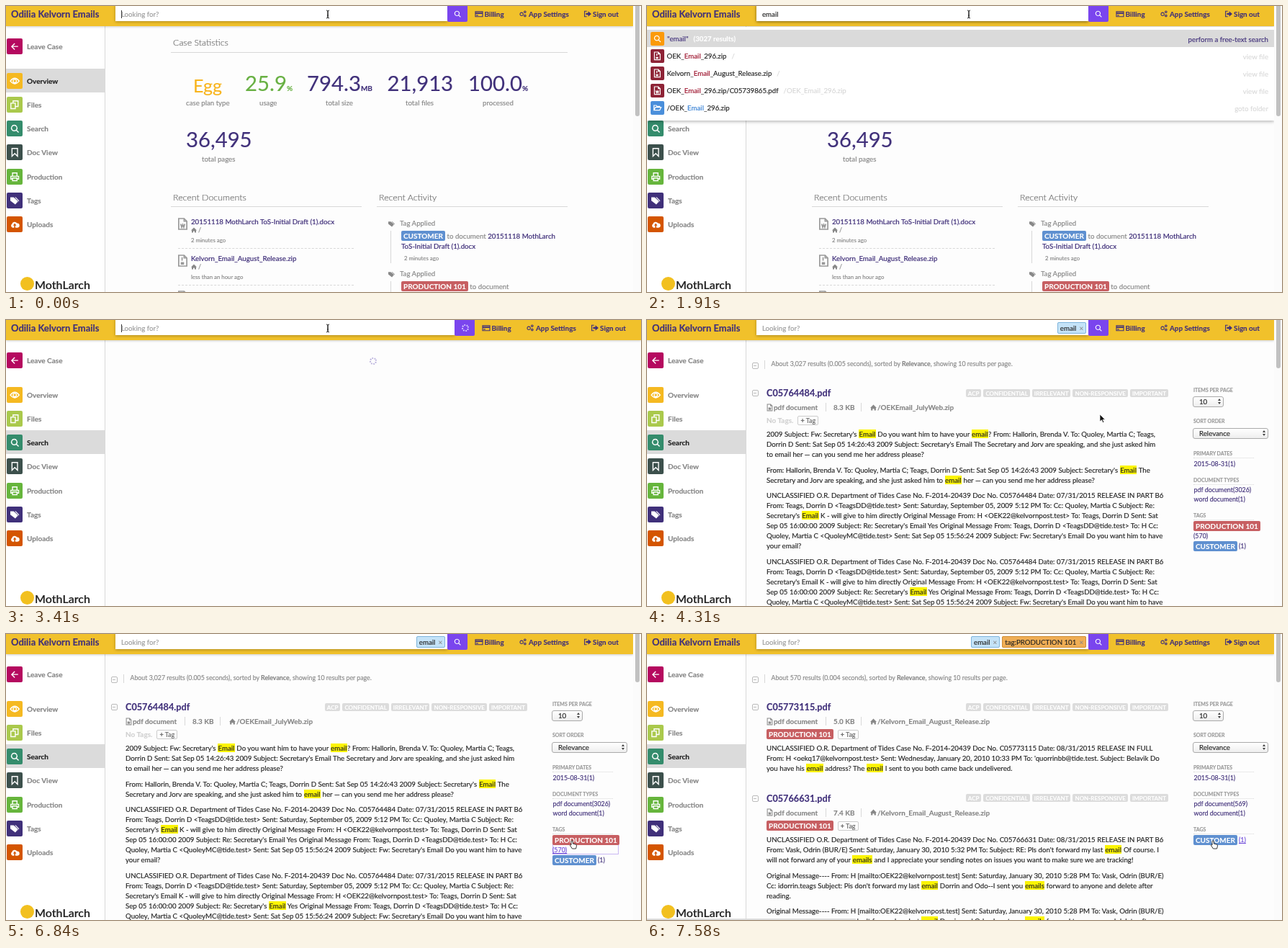
Animation of 882x397 px, one loop 8000 ms. Source, as an HTML page:

```html
<!DOCTYPE html>
<html lang="en">
<head>
<meta charset="utf-8">
<title>Case search</title>
<style>
  html, body { margin: 0; width: 100%; height: 100%; overflow: hidden; }
  #stage { position: relative; width: 882px; height: 397px; overflow: hidden; background: #fdfdfd;
    font: 10px/20px Lato, sans-serif; color: #858585; -webkit-text-stroke: .15px; }
  #stage div, #stage svg { position: absolute; white-space: pre; }
  #stage svg { overflow: visible; }
  .badge { color: #fff; font-size: 10px; padding: 1px 3px; border-radius: 2px; }
  .caret { display: inline-block; height: 11px; border-left: 1px solid #333; margin-right: -1px; vertical-align: -2px; }
  .chip { border: 1px solid; border-radius: 2px; padding: 1px 3px; margin-left: 3px; color: #222; }
  .chip i { font-style: normal; color: #888; margin-left: 4px; }
  .add { border: 1px solid #ccc; border-radius: 2px; padding: 0 3px; margin-left: 6px; color: #666; font-size: 9px; }
  .off { background: #dcdcdc; color: #fff; padding: .5px 3px; border-radius: 2px; margin-left: 3px; }
  .path { color: #d6d6d6; margin-left: 7px; }
  mark { background: #fcf403; color: inherit; padding: 0 .5px; }
</style>
</head>
<body>
<div id="stage"></div>
<script>
const stage = document.getElementById('stage');
const LOOP = 8000, PURPLE = '#40307a', RED = '#c75f62', BLUE = '#5f90d0', INK = '#222';
const BODY = 9.7, SMALL = 7.8;

// Icons on a 16 x 16 grid: path, then whether it is filled
const ICONS = {
  back: ['M14 8H3M8 2.5L2.5 8L8 13.5'],
  eye: ['M0 8Q8-2 16 8Q8 18 0 8zM8 5a3 3 0 1 0 .1 0z'],
  copy: ['M1 5h8v10H1zM5 5V1h9v10H9'],
  find: ['M7 2a5 5 0 1 0 .1 0zM11 11l4 4'],
  flag: ['M3 1h10v14l-5-5l-5 5z'],
  print: ['M4 7V1h8v6M4 12H1V7h14v5h-3M4 10h8v5H4z'],
  tag: ['M0 2h6l8 7l-5 6L0 8zM10 2l6 6l-5 7l4-6L8 2z', 1],
  cloud: ['M4 14a4 4 0 0 1-1-7a5 5 0 0 1 9-1a4 4 0 0 1 1 8H9v-4h2L8 6L5 10h2v4z', 1],
  card: ['M0 3h16v11H0zM0 6h16M0 7h16M2 11h4'],
  cogs: ['M5 5a3.5 3.5 0 1 0 .1 0zM12.500 1.500a2 2 0 1 0 .1 0zM12.500 10a2 2 0 1 0 .1 0z'],
  exit: ['M6 2H1v12h5', 0, 'M4 6h5V2l7 6l-7 6v-4H4z'],
  home: ['M8 1L0 9h2v6h4v-4h4v4h4V9h2z', 1],
  file: ['M2 0h8l4 4v12H2zM10 0v4h4M5 8l1.500 5L8 9l1.500 4L11 8'],
  zip: ['M2 0h8l4 4v12H2zM10 0v4h4M7 3v5M6 11h3v2H6z'],
  folder: ['M1 13V3h5l1 2h6v2M1 13l3-6h12l-3 6z']
};
const CURSORS = {
  beam: '<path d="M-2-5Q0-5 0-3V4Q0 6-2 6M2-5Q0-5 0-3V4Q0 6 2 6M-1 2H1" fill="none" stroke="#222"/>',
  arrow: '<path d="M0 0V10L2.500 7.800L4.200 11.500L5.800 10.700L4.200 7.200H7.300z" fill="#111" stroke="#fff" stroke-width=".7"/>',
  hand: '<path d="M0 0q1.300-.6 1.300 1v3l4.500 1.200q1 .5.500 3L5.500 11H.5L-2.600 6.500q0-1.500 1.600-.5L-1 1Q-1 .2 0 0z" fill="#fff" stroke="#222" stroke-width=".9"/>'
};

const text = (x, y, size, html, css = '') =>
  `<div style="left:${x}px;top:${y - 10}px;font-size:${size}px;${css}">${html}</div>`;
const right = (edge, y, html, css = '') => text(0, y, BODY, html, `left:auto;right:${882 - edge}px;${css}`);
const box = (x, y, w, h, css) => `<div style="left:${x}px;top:${y}px;width:${w}px;height:${h}px;${css}"></div>`;
const fill = c => `background:${c};`;
const ink = (c, weight = 400) => `color:${c};font-weight:${weight};`;
const line = (x, y, w, style = 'solid') => box(x, y, w, 0, `border-top:1px ${style} #d8d8d8`);
const rule = (x, y, h) => box(x, y, 1, h, fill('#d8d8d8'));
const badge = (label, color) => `<b class="badge" style="background:${color}">${label}</b>`;
const icon = (name, x, y, size, color) => {
  const [d, solid, extra = ''] = ICONS[name];
  return `<svg viewBox="0 0 16 16" width="${size}" height="${size}" style="left:${x - size / 2}px;top:${y - size / 2}px">
    <path d="${d}" fill="${solid ? color : 'none'}" stroke="${color}" stroke-width="${solid ? 0 : 1.8}"/><path d="${extra}" fill="${color}"/></svg>`;
};
const tile = (name, x, y, size, color) =>
  box(x - size / 2, y - size / 2, size, size, fill(color) + 'border-radius:2px') + icon(name, x, y, size * .56, '#fff');
const svgAt = (x, y, body) => `<svg width="1" height="1" style="left:${x}px;top:${y}px">${body}</svg>`;
const spinner = (x, y, color, t) => svgAt(x, y,
  `<circle r="4" fill="none" stroke="${color}" stroke-width="2" stroke-dasharray="1.7 1.44" transform="rotate(${Math.floor(t / 150) * 15})"/>`);
const at = (t, table) => table.filter(row => row[0] <= t).pop()[1];
const within = (t, a, b) => t >= a && t < b;

function sidebar(active) {
  const rows = [['Leave Case', 'back', 56, '#b5095f'], ['Overview', 'eye', 104, '#f5b921'], ['Files', 'copy', 137, '#aac94c'],
    ['Search', 'find', 170, '#348c6c'], ['Doc View', 'flag', 203, '#3c504c'], ['Production', 'print', 237, '#66b53c'],
    ['Tags', 'tag', 270, PURPLE], ['Uploads', 'cloud', 303, '#d45500']];
  return box(0, 28, 137, 369, fill('#fff')) + rule(137, 28, 369) + rows.map(([label, name, y, color]) =>
    (label === active ? box(0, y - 17, 137, 33, fill('#dbdbdb')) : '') + tile(name, 12, y, 22, color) +
    text(29, y, 10, label, ink(label === active ? INK : '#858585', 700))).join('') +
    box(20, 376, 19, 19, fill('#f2c01f') + 'border-radius:50%') + text(40, 387, 16, 'MothLarch', ink('#222', 600));
}

function header(t, loading) {
  const dx = loading ? 10 : 0;
  const typed = at(t, [[0, ''], [1030, 'e'], [1170, 'em'], [1320, 'emai'], [1460, 'email'], [2810, '']]);
  const blink = at(t, [[0, 1], [590, 0], [1030, 1], [1910, 0], [2810, 1], [4010, 0], [4450, 1], [4900, 0], [5500, 1],
    [5790, 0], [6240, 1], [6540, 0]]);
  const caret = blink ? '<span class="caret"></span>' : '';
  const glow = within(t, 150, 2810) ? .5 : .3;
  const chip = (label, bg, edge) => `<span class="chip" style="background:${bg};border-color:${edge}">${label}<i>×</i></span>`;
  const chips = (t >= 3560 ? chip('email', '#c4e3f8', '#7fb5dc') : '') +
    (t >= 6990 ? chip('tag:PRODUCTION 101', '#f0ae55', '#cf8d35') : '');
  const link = (name, ix, x, label) => icon(name, ix + dx, 11, 10, PURPLE) + text(x + dx, 11, 9.9, label, ink(PURPLE, 700));
  return box(0, 0, loading ? 882 : 871, 28, fill('#f1c12b') + 'box-shadow:0 1px 3px rgba(0,0,0,.2)') +
    text(7, 10.5, 13, 'Odilia Kelvorn Emails', ink(PURPLE, 700)) +
    box(152, -2, 461 + dx, 23, fill('#fff') + `box-shadow:0 1px 4px rgba(0,0,0,${glow})`) +
    text(160, 11, BODY, typed ? typed + caret : caret + 'Looking for?', ink(typed ? INK : '#999')) +
    right(610 + dx, 11, chips) +
    box(613 + dx, -2, 28, 24, fill('#7a45ee') + 'border-radius:0 0 2px 2px') +
    (loading ? spinner(637.5, 11, '#d9ccff', t) : icon('find', 627, 11, 10, '#fff')) +
    link('card', 657, 664.5, 'Billing') + link('cogs', 718, 726, 'App Settings') + link('exit', 807.5, 815, 'Sign out');
}

function suggestions(t) {
  const query = at(t, [[0, 'e'], [1170, 'em'], [1320, 'emai'], [1460, 'email']]);
  const full = t >= 1460;
  const hit = color => `<span style="color:${color};font-weight:500">Email</span>`;
  const path = p => `<span class="path">${p}</span>`;
  const m = hit('#a01c35');
  const rows = [
    [`OEK_${m}_296.zip${path('/')}`, 'zip', 'view file'],
    [`Kelvorn_${m}_August_Release.zip${path('/')}`, 'zip', 'view file'],
    [`OEK_${m}_296.zip/C05739865.pdf${path('/OEK_Email_296.zip')}`, 'file', 'view file'],
    [`/OEK_${hit('#3f86d6')}_296.zip`, 'folder', 'goto folder']];
  return box(0, 29, 871, full ? 130 : 35, fill('#fff') + 'box-shadow:0 2px 4px rgba(0,0,0,.25)') +
    box(0, 33, 871, 24, fill('#dadada')) + tile('find', 14, 45, 19, '#fb9a09') +
    text(28, 45, BODY, `"${query}"<b style="color:#fff;margin-left:7px">(${full ? 3027 : ''} results)</b>`, ink(PURPLE)) +
    right(863, 46, 'perform a free-text search', ink(PURPLE)) +
    (full ? rows.map(([html, name, hint], i) => {
      const y = 69 + i * 24;
      return tile(name, 14, y, 19, i < 3 ? '#8e2336' : '#4a8fdb') + text(27.5, y, BODY, html, ink(INK)) +
        right(863, y + 1, hint, ink('#d9d9d9'));
    }).join('') : '');
}

function overview() {
  const stat = (x, y, value, unit, color, labelX, label) =>
    text(x, y, 29.3, `${value}<b style="font-size:10px">${unit}</b>`, ink(color)) + text(labelX, y + 27, BODY, label);
  const title = (x, y, label) => text(x, y, 12.4, label, ink('#666', 300));
  const doc = (y, name, label, time) => icon(name, 245.5, y + 3, 15, '#999') + text(257, y, BODY, label, ink(PURPLE, 500)) +
    icon('home', 261, y + 12, 8, '#888') + text(267, y + 12, 9, '/') + text(257, y + 26, SMALL, time) + line(239, y + 37, 244, 'dashed');
  const activity = (y, label) => icon('tag', 535.5, y + 1, 9, '#888') + text(547, y, BODY, 'Tag Applied') +
    rule(534, y + 11, 45) + text(549, y + 18, BODY, label);
  const strong = s => `<span style="${ink(PURPLE, 500)}">${s}</span>`;
  return title(232, 51, 'Case Statistics') + line(229, 64, 551) +
    text(260, 110, 25, 'Egg', ink('#f8b41c')) + text(250, 134, BODY, 'case plan type') +
    stat(332, 107, '25.9', '%', '#68b043', 352, 'usage') + stat(418, 107, '794.3', 'MB', PURPLE, 444, 'total size') +
    stat(529.5, 107, '21,913', '', PURPLE, 555, 'total files') + stat(642, 107, '100.0', '%', PURPLE, 662, 'processed') +
    stat(250, 185, '36,495', '', PURPLE, 272, 'total pages') +
    title(232, 266, 'Recent Documents') + line(229, 278, 265) + title(518, 266, 'Recent Activity') + line(515, 278, 265) +
    doc(299, 'file', '20151118 MothLarch ToS-Initial Draft (1).docx', '2 minutes ago') +
    doc(350, 'zip', 'Kelvorn_Email_August_Release.zip', 'less than an hour ago') + icon('file', 245.5, 403, 15, '#999') +
    activity(301, `${badge('CUSTOMER', BLUE)} to document ${strong('20151118 MothLarch')}`) +
    text(549, 333, BODY, strong('ToS-Initial Draft (1).docx')) + text(553, 350, SMALL, '2 minutes ago') +
    activity(371, `${badge('PRODUCTION 101', RED)} to document`);
}

const check = y => box(146, y - 4, 7, 7, 'border:1px solid #bbb;border-radius:2px') + box(148, y, 4, 1, fill('#bbb'));
const paragraph = (y, lines) => lines.map((s, i) => text(166, y + i * 14, BODY,
  s.replace(/</g, '&lt;').replace(/\*(.+?)\*/g, '<mark>$1</mark>'), ink(INK))).join('');

function result(y, id, size, path, tagged) {
  const meta = ink('#858585', 700);
  const flags = ['ACP', 'CONFIDENTIAL', 'IRRELEVANT', 'NON-RESPONSIVE', 'IMPORTANT'];
  return check(y) + text(166, y, 12.7, id + '.pdf', ink(PURPLE, 700)) +
    right(724, y, flags.map(s => `<b class="off">${s}</b>`).join(''), 'font-size:8px') +
    icon('file', 170, y + 20, 9, '#888') + text(176, y + 20, 9.9, 'pdf document', meta) + rule(248, y + 14, 12) +
    text(259, y + 20, 9.9, size, meta) + rule(297, y + 14, 12) + icon('home', 314.5, y + 20, 9, '#888') +
    text(320, y + 20, 9.9, path, meta) +
    text(166, y + 38, 10, (tagged ? badge('PRODUCTION 101', RED) : '<b style="color:#d0d0d0">No Tags.</b>') +
      '<span class="add"><b>+</b> Tag</span>');
}

function filters(t, second) {
  const label = (y, s, ruled) => text(759, y, 7, s, ink('#999', 700)) + (ruled ? line(759, y + 6, 84, 'dotted') : '');
  const select = (y, w, s) => box(758, y - 7, w, 13, 'border:1px solid #aaa;border-radius:3px;background:linear-gradient(#fff,#eee)') +
    text(767, y, BODY, s, ink(INK)) + svgAt(754 + w, y, '<path d="M-2-1L0-4L2-1zM-2 1L0 4L2 1z" fill="#444"/>');
  const item = (y, s, x = 759.5) => text(x, y, 8.9, s, ink(PURPLE));
  const hover = t >= 5500;
  const count = (x, y, n, on) => item(y, on ? `<u style="color:#6a45d8">(${n})</u>` : `(${n})`, x);
  const tag = (y, s, color) => text(759, y, 10, badge(s, color));
  const tags = second
    ? tag(285.5, 'CUSTOMER', BLUE) + count(822, 286, 1, true)
    : (t >= 6540 ? box(759, 292, 90, 12, 'border:1px solid #c9b8f3') : '') +
      tag(285.5, 'PRODUCTION 101', RED) + count(759, 300, 570, hover) +
      tag(313.5, 'CUSTOMER', BLUE) + count(822, 314, 1);
  return label(97, 'ITEMS PER PAGE') + select(113, 41, '10') + label(140, 'SORT ORDER') + select(157, 103, 'Relevance') +
    label(185, 'PRIMARY DATES', 1) + item(200, '2015-08-31(1)') + label(222, 'DOCUMENT TYPES', 1) +
    item(236, `pdf document(${second ? 569 : 3026})`) + item(249, 'word document(1)') + label(271, 'TAGS', 1) + tags;
}

const release = (id, date, part) =>
  `UNCLASSIFIED O.R. Department of Tides Case No. F-2014-20439 Doc No. ${id} Date: ${date}/31/2015 RELEASE IN ${part}`;
const THREAD = [release('C05764484', '07', 'PART B6'),
  'From: Teags, Dorrin D <TeagsDD@tide.test> Sent: Saturday, September 05, 2009 5:12 PM To: Cc: Quoley, Martia C Subject: Re:',
  "Secretary's *Email* K - will give to him directly Original Message From: H <OEK22@kelvornpost.test> To: Teags, Dorrin D Sent: Sat",
  "Sep 05 16:00:00 2009 Subject: Re: Secretary's Email Yes Original Message From: Teags, Dorrin D <TeagsDD@tide.test> To: H Cc:",
  "Quoley, Martia C <QuoleyMC@tide.test> Sent: Sat Sep 05 15:56:24 2009 Subject: Fw: Secretary's Email Do you want him to have",
  'your email?'];
const THREAD_AGAIN = THREAD.map((s, i) => i === 2 ? s.replace(/\*/g, '') : i === 3 ? s.replace('Email', '*Email*') : s);
const FORWARD = [
  'Original Message---- From: H [mailto:OEK22@kelvornpost.test] Sent: Saturday, January 30, 2010 5:28 PM To: Vask, Odrin (BUR/E)',
  "Cc: idorrin.teags Subject: Pis don't forward my last *email* Dorrin and Odo--I sent you *emails* forward to anyone and delete after",
  'reading.'];

const summary = (n, time) => check(63) + rule(163, 56, 12) + text(172.5, 61, 8.8,
  `About ${n} results (${time} seconds), sorted by <b>Relevance</b>, showing 10 results per page.`);

const firstResults = t => summary('3,027', '0.005') + result(101, 'C05764484', '8.3 KB', '/OEKEmail_JulyWeb.zip') +
  paragraph(158, [
    "2009 Subject: Fw: Secretary's *Email* Do you want him to have your *email*? From: Hallorin, Brenda V. To: Quoley, Martia C; Teags,",
    "Dorrin D Sent: Sat Sep 05 14:26:43 2009 Subject: Secretary's Email The Secretary and Jorv are speaking, and she just asked him",
    'to email her — can you send me her address please?']) +
  paragraph(208, [
    "From: Hallorin, Brenda V. To: Quoley, Martia C; Teags, Dorrin D Sent: Sat Sep 05 14:26:43 2009 Subject: Secretary's *Email* The",
    'Secretary and Jorv are speaking, and she just asked him to *email* her — can you send me her address please?']) +
  paragraph(243, THREAD) + paragraph(335, THREAD_AGAIN) + filters(t, false);

const taggedResults = t => summary('570', '0.004') +
  result(101, 'C05773115', '5.0 KB', '/Kelvorn_Email_August_Release.zip', true) +
  paragraph(158, [release('C05773115', '08', 'FULL'),
    "From: H <oekq17@kelvornpost.test> Sent: Wednesday, January 20, 2010 10:33 PM To: 'quorrinbb@tide.test. Subject: Belavik Do",
    'you have his *email* address? The *email* I sent to you both came back undelivered.']) +
  result(227.5, 'C05766631', '7.4 KB', '/Kelvorn_Email_August_Release.zip', true) +
  paragraph(285, [release('C05766631', '08', 'PART B6'),
    "From: Vask, Odrin (BUR/E) Sent: Saturday, January 30, 2010 5:32 PM To: Subject: RE: Pls don't forward my last *email* Of course. I",
    'will not forward any of your *emails* and I appreciate your sending notes on issues you want to make sure we are tracking!']) +
  paragraph(334.5, FORWARD) + paragraph(384, FORWARD) + filters(t, true);

function draw(t) {
  const loading = within(t, 3260, 3560) || within(t, 7140, 7430);
  const view = t < 3260 ? overview() : loading ? spinner(510, 57, '#b9b0dc', t) : t < 7140 ? firstResults(t) : taggedResults(t);
  const opacity = at(t, [[0, 1], [2810, .8], [2960, .45], [3110, .15], [3260, 1], [6990, .4], [7140, 1]]);
  const [kind, x, y] = at(t, [[0, ['beam', 447, 11]], [4010, ['arrow', 500, 45]], [4160, ['arrow', 609, 121]],
    [4310, ['arrow', 629, 131]], [4450, ['arrow', 690, 204]], [4600, ['arrow', 733, 249]], [4900, ['arrow', 758, 268]],
    [5050, ['arrow', 772, 280]], [5200, ['arrow', 777, 284]], [5500, ['hand', 783, 287]], [5790, ['hand', 786, 287]]]);
  const thumb = t < 2810 ? 153 : 67;
  return `<div style="left:0;top:0;width:882px;height:397px;opacity:${opacity}">${view}</div>` +
    sidebar(t < 2810 ? 'Overview' : 'Search') + header(t, loading) +
    (within(t, 1030, 2810) ? suggestions(t) : '') +
    (loading ? '' : box(871, 0, 11, 397, fill('#fbfbfb')) + box(874, -4, 6, thumb + 4, fill('#c1c1c1') + 'border-radius:3px')) +
    (within(t, 4900, 5200) || t >= 7430 ? box(0, 395, 290, 2, fill('#dcdcdc')) : '') +
    svgAt(x, y, CURSORS[kind]);
}

let shown = '';
function tick() {
  const html = draw(performance.now() % LOOP);
  if (html !== shown) stage.innerHTML = shown = html;
  requestAnimationFrame(tick);
}
tick();
</script>
</body>
</html>
```
